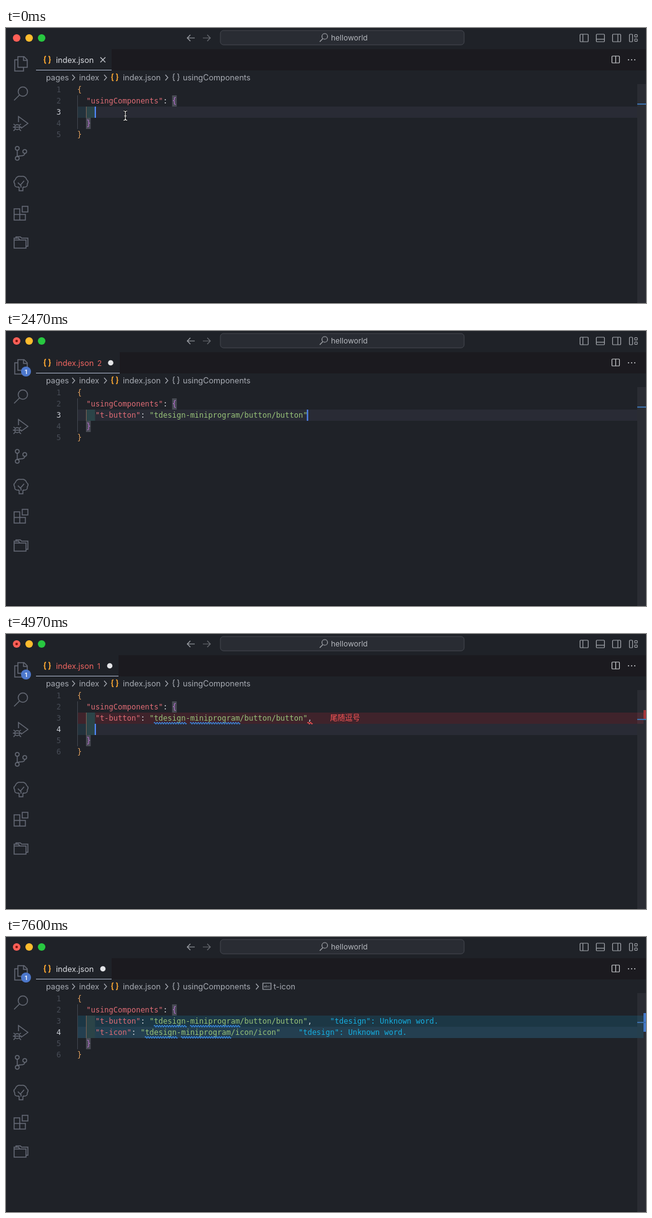
Write an HTML page that moves like this. It is 1024 px wide and 441 px high and loops after 7.63 s.

```html
<!DOCTYPE html>
<html lang="zh">
<head>
<meta charset="utf-8">
<title>Snippet completion</title>
<style>
html, body { margin: 0; width: 100%; height: 100%; overflow: hidden; background: #1f2228; }
svg { display: block; width: 1024px; height: 441px; }
text { white-space: pre; font: 12px "DejaVu Sans Mono", "Noto Sans CJK SC", "Noto Sans CJK", monospace; }
.ui { font: 12.6px Inter, "Noto Sans CJK SC", sans-serif; }
.line { fill: none; stroke-width: 1.2; }
</style>
</head>
<body>
<svg id="stage" viewBox="0 0 1024 441">
  <rect width="1024" height="441" fill="#1f2228"/>
  <rect x="48" y="34" width="976" height="34" fill="#1b1a1f"/>
  <rect y="440" width="1024" height="1" fill="#16181c"/>
  <rect x="1010" y="90" width="14" height="351" fill="#2a2c33"/>
  <circle cx="17" cy="16" r="6" fill="#ff5f57"/>
  <circle cx="37" cy="16" r="6" fill="#febc2e"/>
  <circle cx="57" cy="16" r="6" fill="#28c840"/>
  <rect x="343" y="4" width="390" height="23" rx="5" fill="#292c33" stroke="#44474f"/>
  <text class="ui" x="520" y="20" style="font-size:12px" fill="#b4b7bd">helloworld</text>
  <g class="line" stroke="#a0a3a9">
    <path d="M290 16h12M295 11l-5 5 5 5"/>
    <path d="M315 16h12M322 11l5 5-5 5" stroke="#6a6d73"/>
    <circle cx="510" cy="13.5" r="4.5"/><path d="M507 17l-5 5"/>
    <rect x="918.500" y="10" width="13" height="12" rx="1"/><path d="M923 10v12"/>
    <rect x="944.500" y="10" width="13" height="12" rx="1"/><path d="M945 18h12"/>
    <rect x="970.500" y="10" width="13" height="12" rx="1"/><path d="M979 10v12"/>
    <rect x="997.500" y="10" width="5" height="12" rx="1"/><rect x="1006" y="10.500" width="4" height="4" rx="1"/><rect x="1006" y="17.500" width="4" height="4" rx="1"/>
    <rect x="969.500" y="45" width="12" height="11" rx="1" stroke="#c5c7cb"/><path d="M975.500 45v11" stroke="#c5c7cb"/>
  </g>
  <path d="M996 51h.01M1001 51h.01M1006 51h.01" stroke="#c5c7cb" stroke-width="2" stroke-linecap="round"/>
  <g class="line" style="stroke-width:1.5" stroke="#656a75">
    <path d="M19 51v-5h10l5 5v12H19V51M28 46v6h6M19 51h-5v18h14v-6"/>
    <circle cx="27" cy="102" r="7.500"/><path d="M21.500 107.500L13 116"/>
    <path d="M20 151v-9l15 11-11 8"/><circle cx="18" cy="159" r="4"/><path d="M14 159h8M12 154l3 2M24 154l-3 2M11 159h3M22 159h3M12 165l3-3M24 165l-3-3"/>
    <circle cx="18" cy="193" r="3"/><circle cx="18" cy="209" r="3"/><circle cx="30" cy="198" r="3"/><path d="M18 196v10M30 201q0 4-6 4-5 0-6 2"/>
    <path d="M21 255q-8 1-7-5-3-4 1-7 2-6 9-5 7-1 9 5 4 3 1 7 1 6-7 5M21 255v6h6v-6M19 248l4 4 6-7M24 252v4"/>
    <path d="M13 290h9v18h-9zM13 299h18v9H22M31 299v9M26 286h9v9h-9z"/>
    <path d="M13 340v13h19v-13zM13 340v-3h7l2 3M16 337v-2h7l2 2h10v13h-3M16 340h16"/>
  </g>
  <g id="view"></g>
</svg>
<script>
const LOOP = 7630, CH = 7.224, LEFT = 114;
const RED = '#ff5656', BLUE = '#16aee0', KEY = '#e06c75', STR = '#98c379';

const ITEMS = `action-sheet|ActionSheet 动作面板
avatar|Avatar 头像
avatar-group|Avatar-group 头像
back-top|BackTop 回到顶部
badge|Badge 徽标
button|Button 按钮
calendar|Calendar 日历
cascader|Cascader 级联选择器
cell|Cell 单元格
cell-group|Cell-group 单元格
check-tag|Tag-check 标签
checkbox|Checkbox 多选框
icon|Icon 图标
picker|Picker 选择器
sticky|Sticky 吸顶
notice-bar|NoticeBar 公告栏
swipe-cell|SwipeCell 滑动操作
switch|Switch 开关
date-time-picker|DateTimePicker 时间选择器`.split('\n').map(s => s.split('|'));
const ABOUT = Object.fromEntries(ITEMS);
const ALL = ITEMS.slice(0, 12).map(i => i[0]);
const WITH_I = 'icon picker sticky notice-bar ? swipe-cell switch action-sheet date-time-picker'.split(' ');
const FOUND = {
  't': ALL, 'td': ALL, 'td-': ALL,
  'td-b': 'back-top badge button checkbox notice-bar ?'.split(' '),
  'td-bu': ['button', '?'],
  'td-i': WITH_I, 'td-ic': WITH_I
};

// Timeline: each step overrides part of the state
const entry = n => `"t-${n}": "tdesign-miniprogram/${n}/${n}"`;
const first = entry('button'), done = first + ',';
const unknown = [BLUE, '"tdesign": Unknown word.'];
const noQuotes = [RED, '属性键必须带双引号'], noColon = [RED, '需要冒号'];
const STEPS = [
  [0, { code: [''], query: '', errors: 0, marks: [], words: 0, crumb: '' }],
  [330, { code: ['t'] }],
  [450, { query: 't' }],
  [500, { code: ['td'] }],
  [620, { query: 'td', errors: 2, marks: [noQuotes, noColon] }],
  [1250, { code: ['td-'], query: 'td-' }],
  [1500, { code: ['td-b'] }],
  [1600, { query: 'td-b' }],
  [1800, { code: ['td-bu'], query: 'td-bu' }],
  [2400, { code: [first], query: '', marks: [] }],
  [2800, { errors: 0, marks: [unknown], words: 1, crumb: 't-button' }],
  [3500, { code: [done] }],
  [3700, { errors: 1, marks: [[RED, '尾随逗号']], crumb: '' }],
  [3970, { code: [done, ''] }],
  [5000, { code: [done, 't'] }],
  [5150, { query: 't' }],
  [5300, { code: [done, 'td'] }],
  [5450, { query: 'td', errors: 2, marks: [unknown, noQuotes, noColon] }],
  [5900, { code: [done, 'td-'], query: 'td-' }],
  [6050, { code: [done, 'td-i'], query: 'td-i' }],
  [6250, { code: [done, 'td-ic'], query: 'td-ic' }],
  [7000, { code: [done, entry('icon')], query: '', marks: [unknown] }],
  [7250, { errors: 0, marks: [unknown, unknown], words: 2, crumb: 't-icon' }]
];

const rect = (x, y, w, h, fill, more = '') =>
  `<rect x="${x}" y="${y}" width="${w}" height="${h}" fill="${fill}" ${more}/>`;
const text = (x, y, s, fill, more = '') => `<text x="${x}" y="${y}" fill="${fill}" ${more}>${s}</text>`;
const label = (x, y, s, fill) => text(x, y, s, fill, 'class="ui"');
const path = (d, color, more = '') => `<path class="line" d="${d}" stroke="${color}" ${more}/>`;
const span = (s, fill, more = '') => `<tspan fill="${fill}" ${more}>${s}</tspan>`;
const cross = (x, y) => path(`M${x - 4} ${y - 4}l8 8m0-8l-8 8`, '#c5c8ce');
const rowTop = line => 72 + 18 * line;

function braces(x, y, color, width) {
  const half = 'M-2-5.500q-2 0-2 2v2q0 1.500-1.500 1.500 1.500 0 1.500 1.500v2q0 2 2 2';
  return [1, -1].map(k => path(half, color,
    `transform="translate(${x} ${y}) scale(${k} 1)" style="stroke-width:${width}"`)).join('');
}

function squiggle(x, y, chars, color) {
  return path(`M${x} ${y}` + 'q1-2.600 2 0t2 0'.repeat(Math.max(1, Math.round(chars * CH / 4))), color);
}

function header(s, dirty) {
  const ends = [169, 180, 182][s.errors], dot = [155, 166, 167.5][s.errors];
  let out = rect(48, 34, ends - 48, 34, '#1f2228') + rect(48, 67, ends - 48, 1, '#aab4c8');
  out += braces(66, 51, '#f0a132', 1.8);
  out += label(80, 55.5, 'index.json', s.errors ? '#ee6560' : '#d9dbe0');
  if (s.errors) out += text(146, 55.5, s.errors, '#e0625e', 'class="ui" style="font-size:12px"');
  out += dirty ? `<circle cx="${dot}" cy="51" r="4.300" fill="#e4e5e8"/>` : cross(155, 51);
  if (dirty) {
    out += '<circle cx="17" cy="16" r="2" fill="#7e140d"/><circle cx="32" cy="65" r="8" fill="#4d78cc"/>';
    out += text(32, 68.5, 1, '#fff', 'class="ui" text-anchor="middle" style="font-size:9.500px;font-weight:600"');
  }
  const grey = '#a7abb3', names = [[64, 'pages'], [117, 'index'], [187, 'index.json'], [283, 'usingComponents']];
  const arrows = [108, 159, 257];
  if (s.crumb) {
    names.push([428, s.crumb]);
    arrows.push(402);
    out += path('M411 74h13v10h-13z', grey) + text(417.5, 81, 'abc', grey, 'text-anchor="middle" style="font-size:5.500px"');
  }
  for (const [x, name] of names) out += label(x, 84, name, grey);
  for (const x of arrows) out += path(`M${x - 2} 75l4 4.500-4 4.500`, grey);
  return out + braces(174, 79, '#f0a132', 1.7) + braces(272, 79, grey, 1.2);
}

function colored(line) {
  return line.replace(/"[^"]*"(?=:)|"[^"]*"|[{}]|[^"{}]+/g, (t, at) => span(t,
    t[0] == '"' ? (line[at + t.length] == ':' ? KEY : STR)
      : /[{}]/.test(t) ? (at || line.length > 1 ? '#b66fd0' : '#e5a35f') : '#d2d5db'));
}

function editor(s) {
  const lines = ['{', '  "usingComponents": {', ...s.code.map(c => '    ' + c), '  }', '}'];
  const current = s.code.length + 2;
  let out = rect(LEFT, rowTop(current), 896, 18, '#292b35');
  s.marks.forEach(([color], i) => {
    const y = rowTop(i + 3), red = color == RED;
    out += rect(LEFT, y, 906, 18, red ? '#ff304024' : '#109fd02c');
    out += rect(1020, 122 + 15 * i, 4, red ? 16 : 15, red ? '#a4343a' : '#4478c8');
  });
  out += rect(1010, 121 + 15 * (current - 3), 14, 2, '#3b6ea8');
  s.code.forEach((c, i) => {
    if (!c) out += rect(LEFT, rowTop(i + 3), 14, 18, '#23323c');
    out += rect(128, rowTop(i + 3), 14.5, 18, '#2b4448');
  });
  out += rect(LEFT, rowTop(2), 1, 18 * (lines.length - 2), '#41464e');
  out += rect(128, rowTop(3), 1, 18 * s.code.length, '#7a6153');
  out += rect(265.700, rowTop(2), 7.5, 18, '#484b54') + rect(128, rowTop(lines.length - 1), 7.5, 18, '#484b54');
  lines.forEach((line, i) => {
    const n = i + 1, y = rowTop(n) + 13, mark = s.marks[i - 2];
    out += text(88, y, n, n == current ? '#c8ccd4' : '#474c56', 'text-anchor="end"');
    out += text(LEFT, y, colored(line), '#d2d5db');
    const end = LEFT + line.length * CH;
    if (mark) {
      out += text(end + 4 * CH, y, mark[1], mark[0]);
      if (/^ +t/.test(line)) out += squiggle(LEFT + 4 * CH, y + 4, line.length - 4, RED);
      if (mark[0] == RED && line.endsWith(',')) out += squiggle(end - CH, y + 4, 1, RED);
    }
    if (i - 2 < s.words)
      for (const m of line.matchAll(/tdesign|miniprogram/g))
        out += squiggle(LEFT + m.index * CH, y + 4, m[0].length, '#3b8eea');
  });
  return out;
}

// Emphasise the typed letters in a suggestion
function matched(name, query) {
  const shift = name[0] == '"' ? 1 : 0, tail = query.slice(3), hit = new Set();
  for (let i = 0; i < Math.min(3, query.length); i++) hit.add(i + shift);
  const at = name.indexOf(tail, 3);
  [...tail].forEach((c, i) => hit.add(at < 0 ? name.indexOf(c, 3) : at + i));
  return [...name].map((c, i) => hit.has(i) ? span(c, '#fff', 'font-weight="bold"') : c).join('');
}

function popup(s) {
  const names = FOUND[s.query], long = names == ALL;
  const x = Math.ceil(LEFT + (4 + s.query.length) * CH), y = rowTop(s.code.length + 3) + 1;
  const h = names.length * 18 + 2, edge = x + 430;
  const frame = 'stroke="#2a2c33"';
  let out = rect(x + .5, y + .5, 430, h - 1, '#1b1b20', frame);
  out += rect(x + 1, y + 1, long ? 419 : 429, 18, '#2a2d35');
  if (long) out += rect(edge - 10, y + 1, 10, 40, '#2d3038');
  names.forEach((name, i) => {
    const row = y + 1 + 18 * i, quoted = name == '?';
    out += quoted
      ? path(`M${x + 5} ${row + 14}l6-6q-1-4 3-5l-1 3 2 1 2-2q1 4-4 5l-6 6q-3 0-2-2z`, '#c8cbd0')
      : rect(x + 5, row + 2.5, 12, 12, 'none', 'stroke="#d0d2d6" stroke-width="1.300" stroke-dasharray="1.500 .7"') +
        path(`M${x + 5} ${row + 2.5}h12`, '#d0d2d6');
    out += text(x + 22, row + 13, matched(quoted ? `"${s.query}"` : 'td-' + name, s.query), '#b9bdc6');
    if (!quoted) out += text(edge - 10, row + 12.5, 'TDesign ' + ABOUT[name], i ? '#858992' : '#c3c6cc',
      'text-anchor="end" style="font-size:10.200px"');
  });

  const about = `TDesign ${ABOUT[names[0]].split(' ')[0]} 组件 (TDesign Miniprogram Snippets)`;
  const sample = entry(names[0]), room = 45;
  out += rect(edge + .5, y + .5, 331, 78, '#1b1b20', frame);
  out += text(edge + 6, y + 17, about.slice(0, 40), '#888c95') + text(edge + 6, y + 35, about.slice(40), '#888c95');
  if (sample.length > room) out += rect(edge + 1, y + 68, 222, 10, '#2b2e35');
  out += text(edge + 6, y + 69, sample.slice(0, room), STR);
  return out + cross(edge + 320, y + 13);
}

const view = document.getElementById('view');
const beamShape = 'M188 133q3 0 3 2 0-2 3-2M191 135v11M188 148q3 0 3-2 0 2 3 2M189 141h4';
const beam = path(beamShape, '#000', 'style="stroke-width:3"') + path(beamShape, '#eee');
let shown;

function draw(now) {
  const t = now % LOOP, state = {};
  let edited = 0;
  for (const [at, change] of STEPS) {
    if (at > t) break;
    Object.assign(state, change);
    if (change.code) edited = at;
  }
  const dirty = t >= STEPS[1][0];
  const caretOn = (t - edited) % 1000 < 500;
  const line = state.code.length + 2;
  let out = header(state, dirty) + editor(state);
  if (caretOn) out += rect(LEFT + (4 + state.code.at(-1).length) * CH - 1, rowTop(line), 2, 18, '#528bff');
  if (state.query) out += popup(state);
  if (!dirty) out += beam;
  if (out != shown) view.innerHTML = shown = out;
  requestAnimationFrame(draw);
}
requestAnimationFrame(draw);
</script>
</body>
</html>
```
